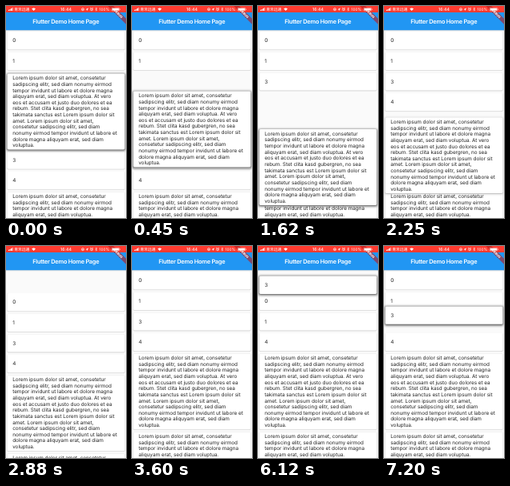
Recreate the animation shown at these times as an HTML page. Size 150 px wide and 265 px high, loop 7.29 s.

```html
<!DOCTYPE html>
<html lang="en">
<head>
<meta charset="utf-8">
<title>Reorderable list</title>
<style>
  html, body { margin: 0; width: 100%; height: 100%; overflow: hidden; background: #fafafa; }
  svg { display: block; width: 100vw; height: 100vh; }
  text { font-family: Inter, "Noto Sans CJK SC", "Noto Sans CJK", sans-serif; text-rendering: geometricPrecision; }
  .body { font-size: 6.4px; fill: #222; letter-spacing: -.04px; }
  .title { font-size: 7.4px; font-weight: 600; fill: #fff; letter-spacing: -.25px; text-anchor: middle; }
  .status { font-size: 4.8px; fill: #fff; }
  .debug { font-size: 4px; font-weight: 800; fill: #fff; text-anchor: middle; }
  .line { fill: none; stroke: #fff; stroke-width: .6; }
</style>
</head>
<body>
<svg viewBox="0 0 150 265" preserveAspectRatio="none">
  <defs>
    <filter id="soft" filterUnits="userSpaceOnUse" x="-10" y="-10" width="170" height="120">
      <feGaussianBlur stdDeviation="1.5"/>
    </filter>
    <linearGradient id="barShade" x2="0" y2="1">
      <stop offset="0" stop-opacity=".18"/>
      <stop offset="1" stop-opacity="0"/>
    </linearGradient>
  </defs>
  <rect width="150" height="265" fill="#fafafa"/>
  <g id="list"></g>

  <rect y="30.2" width="150" height="1.6" fill="url(#barShade)"/>
  <rect width="150" height="30.2" fill="#2196f3"/>
  <text class="title" x="74.8" y="21.8">Flutter Demo Home Page</text>
  <rect width="150" height="8" fill="#ff3b30"/>
  <g transform="translate(150 0) rotate(45)">
    <rect x="-16" y="11.2" width="32" height="4.8" fill="#b71c1c" fill-opacity=".63"/>
    <text class="debug" x="0" y="15.1">DEBUG</text>
  </g>

  <g fill="#fff">
    <path d="M3 6V4.8h1V6zM4.5 6V4h1v2zM6 6V3.1h1V6zM7.5 6V2.2h1V6z"/>
    <text class="status" x="10.2" y="5.9">青禾远通</text>
    <path d="M32.2 3.5Q34.6 1.3 37 3.5L34.6 6.1z"/>
    <text class="status" x="75" y="5.9" text-anchor="middle" font-weight="500" style="font-size:5.2px">16:44</text>
    <circle class="line" cx="96" cy="4.2" r="1.6"/>
    <path d="M95.4 3.7h1.2v1.2h-1.2zM99.4 4.3l3.6-1.9-1.6 3.9-.3-1.8z"/>
    <circle class="line" cx="107" cy="4.3" r="1.5"/>
    <path class="line" d="M107 3.2v1.2h.8M105 2.8l.8-.7M109 2.8l-.8-.7"/>
    <path class="line" style="stroke-width:.45" d="M111.6 3.2l2.2 2-1.1 1V2l1.1 1-2.2 2"/>
    <text class="status" x="116.6" y="5.9">100%</text>
    <rect class="line" style="stroke-width:.4" x="132.2" y="2.3" width="9.4" height="3.8" rx=".7"/>
    <rect x="132.8" y="2.9" width="8.2" height="2.6" rx=".3"/>
    <rect x="142" y="3.5" width=".6" height="1.4"/>
  </g>
</svg>
<script>
const LOOP = 7290, ROW = 25.6, LINE = 7.636, TOP = 30.4;
const LONG = [
  'Lorem ipsum dolor sit amet, consetetur',
  'sadipscing elitr, sed diam nonumy eirmod',
  'tempor invidunt ut labore et dolore magna',
  'aliquyam erat, sed diam voluptua. At vero',
  'eos et accusam et justo duo dolores et ea',
  'rebum. Stet clita kasd gubergren, no sea',
  'takimata sanctus est Lorem ipsum dolor sit',
  'amet. Lorem ipsum dolor sit amet,',
  'consetetur sadipscing elitr, sed diam',
  'nonumy eirmod tempor invidunt ut labore et',
  'dolore magna aliquyam erat, sed diam',
  'voluptua.'
];
const SHORT = [...LONG.slice(0, 3), 'aliquyam erat, sed diam voluptua.'];
const heightOf = lines => lines.length > 1 ? lines.length * LINE + 6.4 : ROW;
const TALL = heightOf(LONG);
const list = document.getElementById('list');

function add(parent, tag, attrs, text) {
  const el = document.createElementNS('http://www.w3.org/2000/svg', tag);
  for (const k in attrs) el.setAttribute(k, attrs[k]);
  if (text) el.textContent = text;
  return parent.appendChild(el);
}

function makeItem({ lines, lift }) {
  const h = heightOf(lines);
  const el = add(list, 'g', {});
  const shadow = lift && add(el, 'rect', {
    x: .8, y: 1.4, width: 148.4, height: h - 1.4, rx: 1.6,
    fill: '#000', 'fill-opacity': .6, filter: 'url(#soft)'
  });
  const card = (x, y, w, dh, fill, alpha) => add(el, 'rect', {
    x, y, width: w, height: h - 3.2 + dh, rx: 1.6, fill, 'fill-opacity': alpha
  });
  card(1.2, 1.6, 147.6, 1.1, '#000', .05);
  card(1.5, 1.7, 147, .5, '#000', .12);
  card(1.6, 1.6, 146.8, 0, '#fff', 1);
  lines.forEach((s, i) => add(el, 'text', {
    class: 'body', x: 8.2, y: (lines.length > 1 ? 9.3 : 15) + i * LINE
  }, s));
  return { el, shadow };
}

// Smooth curve through [time, value] points, flat at turning points.
function track(keys, t) {
  const last = keys.length - 1;
  if (t <= keys[0][0]) return keys[0][1];
  if (t >= keys[last][0]) return keys[last][1];
  const i = keys.findIndex(k => k[0] > t) - 1;
  const rate = n => (keys[n + 1][1] - keys[n][1]) / (keys[n + 1][0] - keys[n][0]);
  const slope = n => {
    if (n === 0 || n === last) return 0;
    const a = rate(n - 1), b = rate(n);
    return a * b <= 0 ? 0 : 2 * a * b / (a + b);
  };
  const [t0, a] = keys[i], [t1, b] = keys[i + 1];
  const d = t1 - t0, u = (t - t0) / d, v = 1 - u;
  return a * v * v * (1 + 2 * u) + b * u * u * (3 - 2 * u)
    + d * u * v * (v * slope(i) - u * slope(i + 1));
}

const slot = n => TOP + n * ROW;
const scroll = [[2480, 0], [2640, 9], [2880, 27], [3000, 29], [3150, 20], [3300, 6], [3420, 1.4], [3560, 0]];

const items = [
  { lines: ['0'], y: [[5230, slot(0)], [5480, slot(1)], [6230, slot(1)], [6480, slot(0)]] },
  { lines: ['1'], y: [[4560, slot(1)], [4830, slot(2)], [6750, slot(2)], [7020, slot(1)]] },
  { lines: ['4'], y: [[1830, slot(3) + TALL], [2090, slot(3)]] },
  { lines: SHORT, y: [[0, slot(4) + TALL]] },
  {
    lines: ['3'],
    y: [[1220, slot(2) + TALL], [1480, slot(2)], [4260, slot(2)], [4500, 75], [4860, 57.6],
        [4950, 53.8], [5250, 42], [5600, 33], [6000, 33], [6300, 45], [6480, 54],
        [6800, 65], [7110, 74.2], [7200, 73.8]],
    lift: [[4150, 0], [4300, 1]]
  },
  {
    lines: LONG,
    y: [[-150, 81.6], [0, 83], [450, 105], [900, 127.5], [1250, 141], [1620, 152.5], [1850, 162],
        [2050, 162], [2320, slot(4)]],
    lift: [[2080, 1], [2320, 0]]
  }
];
for (const it of items) it.view = makeItem(it);

function draw(t) {
  list.setAttribute('transform', `translate(0 ${track(scroll, t)})`);
  for (const { view, y, lift } of items) {
    view.el.setAttribute('transform', `translate(0 ${track(y, t)})`);
    if (lift) view.shadow.setAttribute('opacity', track(lift, t));
  }
}

let start;
function tick(now) {
  start ??= now;
  draw((now - start) % LOOP);
  requestAnimationFrame(tick);
}
draw(0);
requestAnimationFrame(tick);
</script>
</body>
</html>
```
